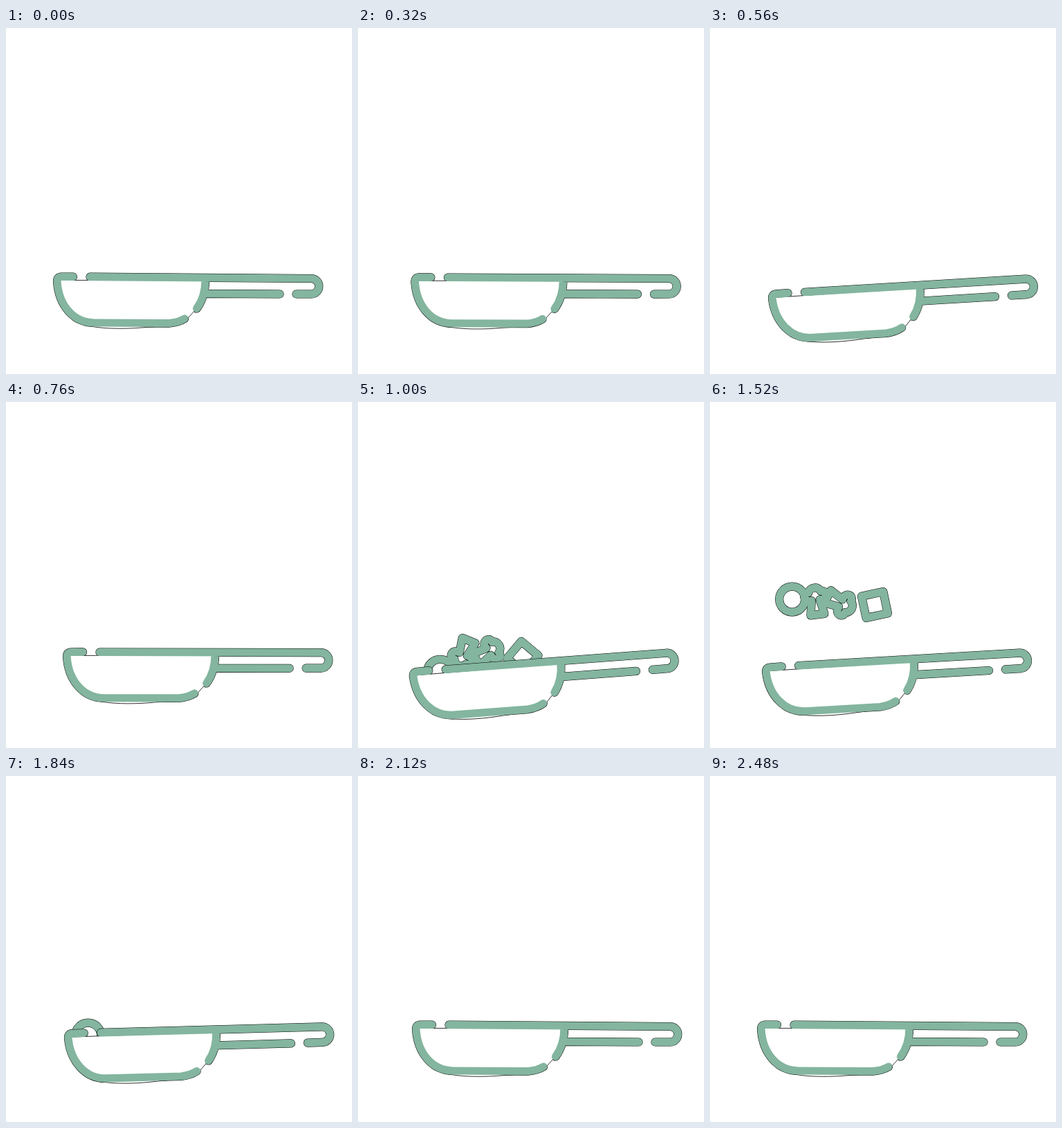
An HTML page for the animation above (2560 ms loop, 500 by 500 pixels).

```html
<!DOCTYPE html>
<html lang="en">
<head>
<meta charset="utf-8">
<title>Frying pan toss</title>
<style>
  html, body { margin: 0; width: 100%; height: 100%; overflow: hidden; background: #fff; }
  svg { display: block; width: 100vw; height: 100vh; }
  .line { fill: none; stroke-linecap: round; stroke-linejoin: round; }
  .edge { stroke: #000; stroke-width: 12.2; }
  .tint { stroke: #83b59f; stroke-width: 11.2; }
  .body { fill: #fff; stroke: #000; stroke-width: .8; }
</style>
</head>
<body>
<svg viewBox="0 0 500 500">
  <defs>
    <circle id="ring" r="18.5"/>
    <path id="cube" d="M-16-16H16V16H-16Z"/>
    <path id="mushroom" d="M-10 19H10L6-2C18 0 19-15 9-14C6-22-6-22-9-14C-19-15-18 0-6-2Z"/>
    <path id="outline" d="M97 359.5H80Q74 359.5 74 366C76 400 97 426 128 426L235 426.7Q249 425.5 258 420
      M275.5 405.5C284 394 288 382 288 364
      M121.5 359.7L441 362A11.2 11.2 0 0 1 441 384.5H419.5
      M290 383.8L395.5 384.5"/>
  </defs>
  <g id="food"></g>
  <g id="pan">
    <use href="#outline" class="line edge"/>
    <path class="body" d="M74 364.5H288C288 382 284 394 275 406L262 420C250 431 225 431 200 432.7
      C175 435 145 435 125 431.5Q105 428 96 422C84 408 74 390 74 364.5Z"/>
    <use href="#outline" class="line tint"/>
  </g>
</svg>
<script>
const LOOP = 2560, STEP = 40, LAST = 2480, SWAY = 1240;

// peak: time and height of the top of the flight; angle at 1200 ms and spin in degrees per ms
const food = [
  { shape: 'ring', x: 118.7, peak: 1433, top: 281.6, angle: 0, spin: 0 },
  { shape: 'mushroom', x: 153, peak: 1386, top: 280, angle: -100, spin: .29 },
  { shape: 'mushroom', x: 187, peak: 1383, top: 281, angle: 80, spin: .115 },
  { shape: 'cube', x: 238, peak: 1388, top: 285, angle: 20, spin: -.1 }
];
// Dips of the pan: centre, half width, degrees
const dips = [[540, 250, 3.9], [975, 245, 4.8], [1590, 500, 3.9]];

const foodLayer = document.getElementById('food');
const pan = document.getElementById('pan');

function addUse(shape, style) {
  const el = document.createElementNS('http://www.w3.org/2000/svg', 'use');
  el.setAttribute('href', '#' + shape);
  el.setAttribute('class', 'line ' + style);
  return foodLayer.appendChild(el);
}
for (const style of ['edge', 'tint'])
  for (const item of food) (item.parts ??= []).push(addUse(item.shape, style));

function bump(t, [centre, half, size]) {
  const d = Math.abs(t - centre) / half;
  return d < 1 ? size * Math.cos(d * Math.PI / 2) ** 2 : 0;
}

function draw(t) {
  const shift = 8 * (1 - Math.cos(2 * Math.PI * t / SWAY));
  const tilt = dips.reduce((sum, dip) => sum + bump(t, dip), 0);
  pan.setAttribute('transform', `translate(${shift} 0) rotate(${-tilt} 450 373)`);

  for (const { x, peak, top, angle, spin, parts } of food) {
    const d = t - peak;
    const y = top + 4.5e-4 * d ** 2 + 6.9e-10 * d ** 4;
    for (const el of parts) {
      el.setAttribute('visibility', y < 400 ? 'visible' : 'hidden');
      el.setAttribute('transform', `translate(${x} ${y}) rotate(${angle + spin * (t - 1200)})`);
    }
  }
}

const start = performance.now();
function tick() {
  const t = (performance.now() - start) % LOOP;
  draw(Math.min(Math.floor(t / STEP) * STEP, LAST));
  requestAnimationFrame(tick);
}
tick();
</script>
</body>
</html>
```
